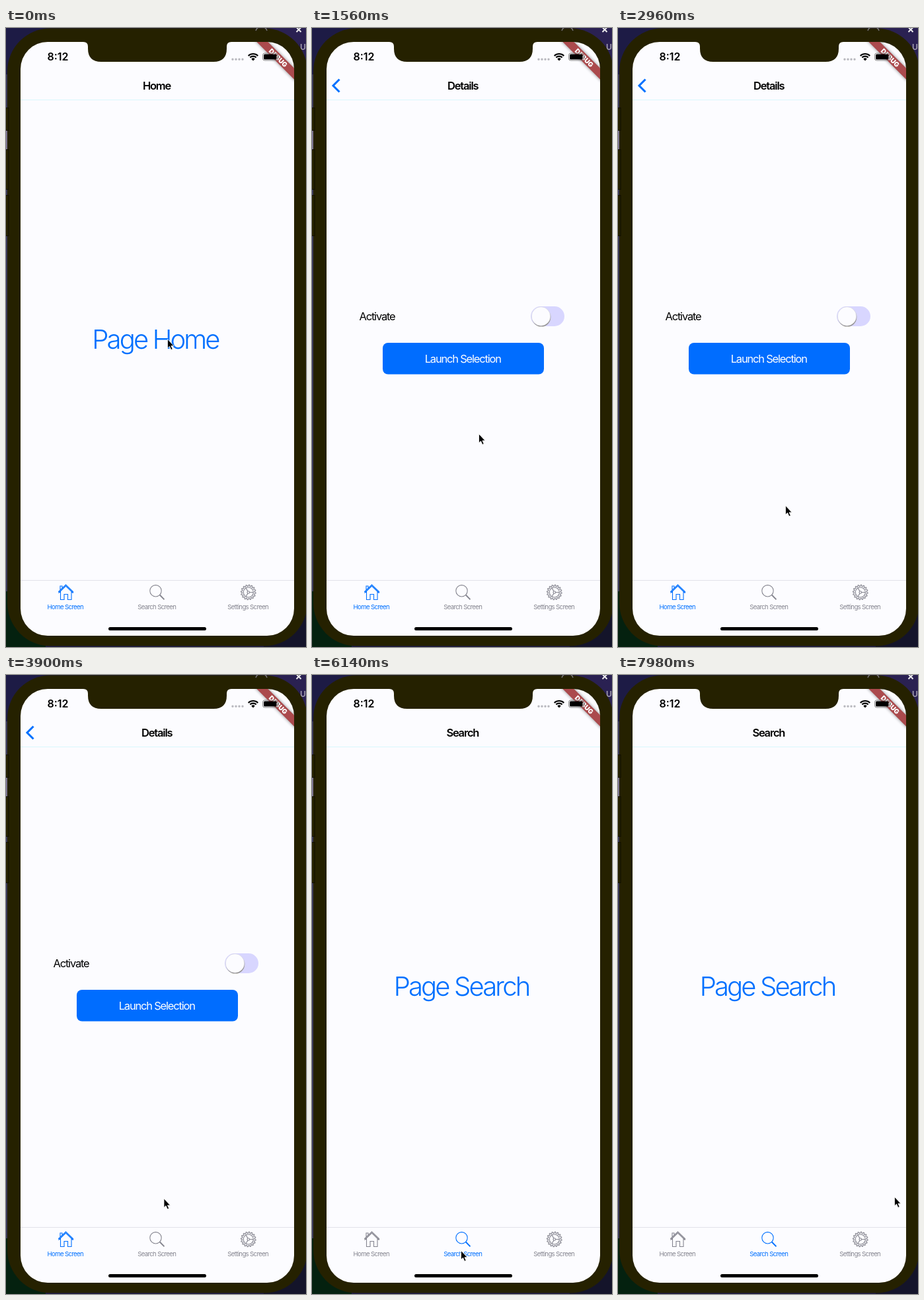
An HTML page that plays this animation: 454 px wide and 934 px high, repeating every 8 s.

```html
<!DOCTYPE html>
<html lang="en">
<head>
<meta charset="utf-8">
<title>Tab navigation</title>
<style>
  html, body { margin: 0; width: 100%; height: 100%; overflow: hidden; background: #1d1b45; }
  svg { display: block; width: 454px; height: 934px; }
  text { font-family: Inter, Roboto, sans-serif; font-optical-sizing: none; }
  .mid text, text.mid { text-anchor: middle; }
  .title { font-size: 16.5px; font-weight: 600; letter-spacing: -1.2px; }
  .big { font-size: 40px; font-weight: 300; letter-spacing: -2.85px; fill: #0070ff; }
  .body { font-size: 16.5px; letter-spacing: -1.2px; }
  .tab { color: #85858f; }
  .tab.on { color: #0070ff; }
  .tab text { font-size: 9.6px; letter-spacing: -.65px; fill: currentColor; }
  .tab path, .tab circle { fill: none; stroke: currentColor; stroke-width: 1.1; }
</style>
</head>
<body>
<svg viewBox="0 0 454 934">
  <defs>
    <clipPath id="screen"><rect x="22" y="21" width="414" height="896" rx="41"/></clipPath>
    <clipPath id="view"><rect x="22" y="109" width="414" height="724"/></clipPath>
    <filter id="blur" x="-20%" y="-100%" width="140%" height="300%"><feGaussianBlur stdDeviation="2.5"/></filter>
  </defs>

  <!-- desktop -->
  <rect width="454" height="934" fill="#1d1b45"/>
  <rect x="380" width="74" height="70" fill="#2a2152"/>
  <rect y="850" width="60" height="84" fill="#04210f"/>
  <rect x="390" y="850" width="64" height="84" fill="#14142a"/>
  <rect x="0.5" y="70" width="1" height="780" fill="#57566c"/>
  <rect x="0" y="155" width="3" height="29" fill="#7c7490"/>
  <path d="M439.500 -1l7 7m0 -7l-7 7" stroke="#eee" stroke-width="2"/>
  <text x="445" y="33" font-size="12" font-weight="600" fill="#a9a4b4">U</text>

  <!-- device -->
  <rect x="2" y="0.500" width="454" height="932" rx="65" fill="#252100"/>
  <path d="M378 4a9 9 0 0 1 17 0" fill="none" stroke="#77747c" stroke-width="1.500"/>
  <g fill="#252100" stroke="#100e00">
    <rect x="-3" y="120.500" width="7" height="34"/>
    <rect x="-3" y="183.500" width="7" height="60"/>
    <rect x="-3" y="252.500" width="7" height="61"/>
  </g>

  <g clip-path="url(#screen)">
    <rect x="22" y="21" width="414" height="896" fill="#fcfcff"/>

    <g clip-path="url(#view)">
      <g id="home"><text class="big mid" x="226" y="484">Page Home</text></g>
      <g id="details">
        <rect x="22" y="109" width="414" height="724" fill="#fcfcff"/>
        <text class="body" x="71.500" y="441">Activate</text>
        <rect x="331" y="420" width="51" height="30" rx="15" fill="#d8d6ff"/>
        <circle cx="347" cy="436.300" r="14.300" fill="#8f8d86"/>
        <circle cx="346.500" cy="435" r="14.300" fill="#fcfcff" stroke="#c9c8d8" stroke-width=".5"/>
        <rect x="107" y="475" width="244" height="47.500" rx="8" fill="#006dff"/>
        <text class="body mid" x="228.200" y="505" fill="#fff">Launch Selection</text>
      </g>
      <g id="search"><text class="big mid" x="226" y="484">Page Search</text></g>
    </g>

    <!-- navigation bar -->
    <g class="mid">
      <text id="homeTitle" class="title" x="228" y="93">Home</text>
      <text id="detailsTitle" class="title" x="228.200" y="93">Details</text>
      <text id="searchTitle" class="title" x="227.800" y="93">Search</text>
    </g>
    <path id="back" d="M41.500 77.500L32 87l9.500 9.500" fill="none" stroke="#0070ff" stroke-width="3"/>
    <path d="M22 108.500H436" stroke="#d9f7fc"/>

    <!-- tab bar -->
    <path d="M22 833.500H436" stroke="#e2e2e9"/>
    <g id="homeTab" class="tab mid">
      <path d="M79.500 852.500L90.500 842l11 10.500M79.500 851V850.500L90.500 840l11 10.500V852.500M82.500 850V862.500H88V854.500H93.500V862.500H99V850M82 848V842H85V845"/>
      <text x="89.800" y="877">Home Screen</text>
    </g>
    <g id="searchTab" class="tab mid">
      <circle cx="226.500" cy="849.300" r="8.700"/>
      <path d="M232.800 855.500L239.500 862.300" style="stroke-width:1.900"/>
      <text x="228.200" y="877">Search Screen</text>
    </g>
    <g class="tab mid">
      <path id="gear"/>
      <circle cx="366.800" cy="851.500" r="7.500"/>
      <circle cx="366.800" cy="851.500" r="1.800"/>
      <path d="M368.600 851.500H374.300M365.900 849.900L363 845M365.900 853.100L363 858"/>
      <text x="366.200" y="877">Settings Screen</text>
    </g>
    <rect x="155" y="904" width="148" height="5" rx="2.500"/>

    <!-- debug ribbon -->
    <g transform="translate(436 21) rotate(45)">
      <rect x="-44" y="28" width="88" height="12" fill="#000" opacity=".45" filter="url(#blur)"/>
      <rect x="-44" y="28" width="88" height="12" fill="#ab4a4d"/>
      <text class="mid" x="0" y="37.700" font-size="10" font-weight="900" fill="#fff">DEBUG</text>
    </g>
  </g>

  <!-- status bar -->
  <path d="M117 20V21Q124 21 124 28V31Q124 51 144 51H314Q334 51 334 31V28Q334 21 341 21V20Z" fill="#252100"/>
  <text x="62.500" y="49" font-size="16" font-weight="600">8:12</text>
  <path d="M343 47.300H360" stroke="#b9b9bf" stroke-width="3.400" stroke-linecap="round" stroke-dasharray="0 5"/>
  <path d="M366.700 42a10.400 10.400 0 0 1 14.600 0M369.300 44.600a6.700 6.700 0 0 1 9.400 0" fill="none" stroke="#000" stroke-width="2.100"/>
  <path d="M371.300 46.700a3.800 3.800 0 0 1 5.400 0L374 49.400Z"/>
  <rect x="388.500" y="38" width="22.500" height="11" rx="3" fill="none" stroke="#777" stroke-width=".9"/>
  <rect x="390" y="39.500" width="19.500" height="8" rx="1.600"/>
  <path d="M412.300 41.500v4" stroke="#777" stroke-width="1.300"/>

  <path id="cursor" d="M0 0V13.500L3 10.800L5.300 16L7.700 15L5.400 10.200H9.600Z" stroke="#fff" stroke-width=".8"/>
</svg>
<script>
  const LOOP = 8000, PUSH = 1040, PUSH_TIME = 500, SWITCH = 5040;
  // time, x, y of the pointer tip
  const route = [
    [0, 244.5, 469.5], [820, 252.5, 612.5], [1560, 252.5, 612.5], [2260, 254.5, 716.5],
    [2800, 254.5, 716.5], [3900, 239, 790], [4500, 225.5, 868.5], [6500, 225.5, 868.5],
    [7900, 418.5, 787.5], [LOOP, 418.5, 787.5]
  ];
  const $ = id => document.getElementById(id);
  const clamp = v => Math.max(0, Math.min(1, v));
  const show = (id, on) => { $(id).style.display = on ? '' : 'none'; };
  const slide = (id, x) => $(id).setAttribute('transform', `translate(${x} 0)`);
  const fade = (id, v) => $(id).setAttribute('opacity', clamp(v));

  function gearPath(cx, cy, teeth) {
    const points = [];
    for (let i = 0; i < teeth * 4; i++) {
      const a = (i + 0.5) * Math.PI / teeth / 2;
      const r = i % 4 < 2 ? 11.3 : 9.3;
      points.push(`${(cx + r * Math.cos(a)).toFixed(2)} ${(cy + r * Math.sin(a)).toFixed(2)}`);
    }
    return `M${points.join('L')}Z`;
  }

  function pointer(t) {
    const i = route.findIndex(p => p[0] > t);
    const [t0, x0, y0] = route[i - 1], [t1, x1, y1] = route[i];
    const p = (t - t0) / (t1 - t0), e = p * p * (3 - 2 * p);
    return [x0 + (x1 - x0) * e, y0 + (y1 - y0) * e];
  }

  function draw(t) {
    const searching = t >= SWITCH;
    const e = 1 - (1 - clamp((t - PUSH) / PUSH_TIME)) ** 3.5;
    for (const id of ['home', 'homeTitle']) show(id, !searching && e < 1);
    for (const id of ['details', 'detailsTitle', 'back']) show(id, !searching && e > 0);
    for (const id of ['search', 'searchTitle']) show(id, searching);
    slide('home', -138 * e);
    slide('details', 414 * (1 - e));
    slide('homeTitle', -165 * e);
    slide('detailsTitle', 207 * (1 - e));
    fade('homeTitle', 1 - 1.6 * e);
    fade('detailsTitle', 1.4 * e - 0.4);
    fade('back', e);
    $('homeTab').classList.toggle('on', !searching);
    $('searchTab').classList.toggle('on', searching);
    $('cursor').setAttribute('transform', `translate(${pointer(t)})`);
  }

  $('gear').setAttribute('d', gearPath(366.8, 851.5, 16));
  const start = performance.now();
  function tick() {
    draw((performance.now() - start) % LOOP);
    requestAnimationFrame(tick);
  }
  tick();
</script>
</body>
</html>
```
